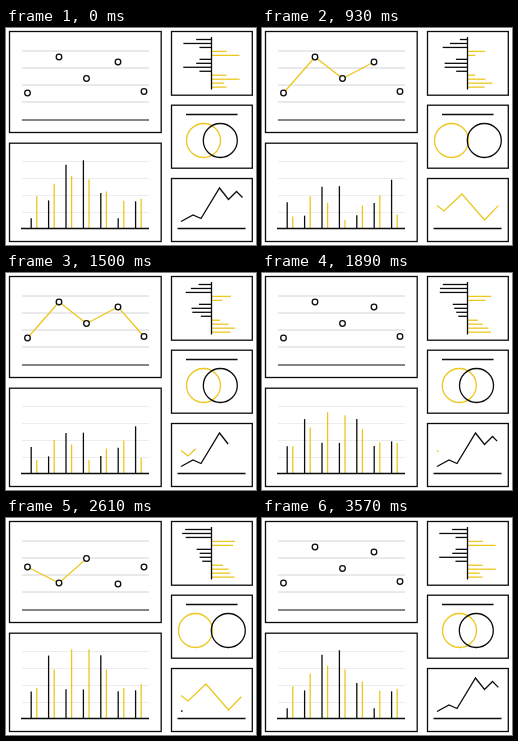
An HTML page with a canvas that plays this animation: 250 by 217 pixels, repeating every 3.6 s.

```html
<!DOCTYPE html>
<html lang="en">
<head>
<meta charset="utf-8">
<title>Charts</title>
<style>
html, body { margin: 0; height: 100%; overflow: hidden; background: #fff; }
canvas { display: block; }
</style>
</head>
<body>
<canvas id="stage" width="250" height="217"></canvas>
<script>
const ctx = document.getElementById('stage').getContext('2d');
const LOOP = 3600, BLACK = '#0c0c0c', YELLOW = '#ecc71f';

const mix = (a, b, k) => a + (b - a) * k;
const quad = x => x < .5 ? 2 * x * x : 1 - 2 * (1 - x) ** 2;
const cubic = x => x < .5 ? 4 * x ** 3 : 1 - 4 * (1 - x) ** 3;
const ramp = (t, start, length, ease = quad) => ease(Math.min(1, Math.max(0, (t - start) / length)));
const wave = (mean, swing, rate, peak) => i => mean + swing * Math.cos(rate * (i - peak));

// Bar lengths follow three waves in turn.
const blackBars = [wave(41, 31, 1.25, 2.6), wave(30, 19, 1.8, 6), wave(40, 24, 2.1, 4)];
const yellowBars = [wave(40, 13, 1, 2.2), wave(21, 13, 1.8, 4.8), wave(51, 22, 1.1, 2.5)];
const rows = [wave(18.5, 10, 2.09, .9), wave(16, 9, 1.4, 2), wave(19, 10.5, .48, 1)];

const dotX = [21.5, 53, 80.5, 112, 138];
const dotY = [[65, 29, 50.5, 34, 63.5], [49, 65, 40.5, 66, 49]];
const blackTrend = [[175, 193.5], [187, 187], [195, 190.5], [213.5, 160], [222.5, 171.5], [230.5, 163.5], [236.5, 169.5]];
const yellowTrend = [[175, 177.5], [182, 183], [200, 166], [222.5, 192], [236.5, 177.5]];

function stroke(points, color = BLACK, width = 1.3) {
  ctx.strokeStyle = color;
  ctx.lineWidth = width;
  ctx.beginPath();
  points.forEach(p => ctx.lineTo(...p));
  ctx.stroke();
}

const across = (x1, x2, y, color, width) => stroke([[x1, y], [x2, y]], color, width);
const down = (x, y1, y2, color) => stroke([[x, y1], [x, y2]], color);

function trim(points, part, color) {
  if (part < .005) return;
  const length = points.slice(1).reduce((sum, [x, y], i) => sum + Math.hypot(x - points[i][0], y - points[i][1]), 0);
  ctx.setLineDash([length * part, length + 1]);
  stroke(points, color);
  ctx.setLineDash([]);
}

function ring(x, y, r, color, fill = 'transparent') {
  ctx.beginPath();
  ctx.arc(x, y, r, 0, 7);
  ctx.fillStyle = fill;
  ctx.fill();
  ctx.strokeStyle = color;
  ctx.lineWidth = 1.3;
  ctx.stroke();
}

function panel(left, top, right, bottom) {
  ctx.strokeStyle = BLACK;
  ctx.lineWidth = 1.3;
  ctx.strokeRect(left, top, right - left, bottom - top);
}

function cycle(waves, t, length, ease) {
  const step = Math.floor(t / 1200) % 3;
  const k = ramp(t % 1200, 0, length, ease);
  return i => mix(waves[step](i), waves[(step + 1) % 3](i), k);
}

function lineChart(t) {
  panel(3.5, 3.5, 155.2, 104.5);
  for (let y = 23; y < 80; y += 17) across(16, 143, y, '#d4d4d4', 1);
  across(16, 143, 92, BLACK, 1.2);
  const move = ramp(t, 1890, 330, cubic) - ramp(t, 3240, 330, cubic);
  const points = dotX.map((x, i) => [x, mix(dotY[0][i], dotY[1][i], move)]);
  const drawn = ramp(t, 600, 500) - ramp(t, 1650, 240) + ramp(t, 2360, 500) - ramp(t, 3150, 120);
  trim(points, drawn, YELLOW);
  points.forEach(([x, y]) => ring(x, y, 2.8, BLACK, '#fff'));
}

function barChart(t) {
  panel(3.5, 115.2, 155.2, 213.5);
  for (let y = 133.5; y < 190; y += 17) across(16, 143, y, '#ececec', 1);
  const black = cycle(blackBars, t, 1080, cubic);
  const yellow = cycle(yellowBars, t, 1080, cubic);
  for (let i = 0; i < 7; i++) {
    const x = 25.2 + 17.4 * i;
    down(x, 200.5, 200.5 - black(i), BLACK);
    down(x + 5.6, 200.5, 200.5 - yellow(i), YELLOW);
  }
  across(15, 143, 200.5);
}

function rowChart(t) {
  panel(165.5, 3.5, 246.3, 67.2);
  const length = cycle(rows, t + 100, 1120, quad);
  for (let i = 0; i < 13; i++) {
    const right = i > 8 || i === 3 || i === 4;
    across(205.5, 205.5 + (right ? length(i) : -length(i)), 11.5 + 3.97 * i, right ? YELLOW : BLACK);
  }
  down(205.5, 9, 61.5);
}

function venn(t) {
  panel(165.5, 77.2, 246.3, 140.2);
  const apart = ramp(t, 0, 480, cubic) - ramp(t, 1060, 480, cubic);
  across(180, 231.5, 86.5);
  ring(197.5 - 8 * apart, 112.5, 17, YELLOW);
  ring(214.3 + 8 * apart, 112.5, 17, BLACK);
}

function trends(t) {
  panel(165.5, 150.5, 246.3, 213.5);
  const swap = ramp(t, 0, 900) - ramp(t, 900, 900);
  trim(yellowTrend, swap, YELLOW);
  trim(blackTrend, 1 - swap, BLACK);
  across(171.5, 239.5, 200.5);
}

function draw(now) {
  const t = now % LOOP;
  ctx.fillStyle = '#fff';
  ctx.fillRect(0, 0, 250, 217);
  lineChart(t);
  barChart(t);
  rowChart(t);
  venn(t % 1800);
  trends(t % 1800);
  requestAnimationFrame(draw);
}
draw(0);
</script>
</body>
</html>
```
